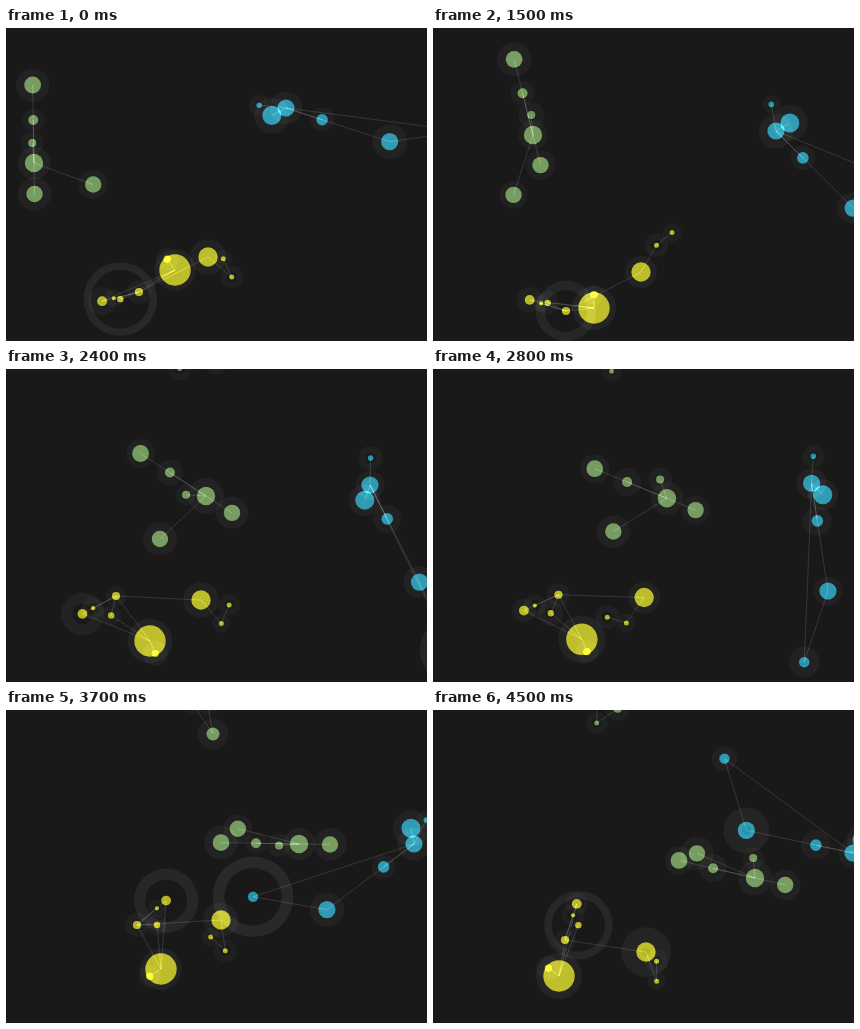
These frames come from a looping animation (421x313 px, 4600 ms). An HTML page with a canvas:

```html
<!DOCTYPE html>
<html lang="en">
<head>
<meta charset="utf-8">
<title>Drifting molecules</title>
<style>
html, body { margin: 0; width: 100%; height: 100%; overflow: hidden; background: #191919; }
canvas { display: block; width: 421px; height: 313px; }
</style>
</head>
<body>
<canvas id="stage" width="421" height="313"></canvas>
<script>
const LOOP = 4600, STEP = 100;
const KNOTS = [0, 800, 1500, 2400, 3200, 3700, 4500];
const GREEN = 'rgb(85,123,65)', BLUE = 'rgb(15,121,145)', YELLOW = 'rgb(155,155,10)';
const ctx = document.getElementById('stage').getContext('2d');

const dots = [], bonds = [];

function add(dot) {
  dot.seed = dots.length * 2.4;
  dots.push(dot);
  return dot;
}

// A hub follows key points; an arm turns around its parent at a fixed length.
// Flares are [time, size] pairs at which the halo swells.
const hub = (color, r, xs, ys, ...flares) => add({ color, r, xs, ys, flares });

function arm(parent, r, length, angle, ...flares) {
  const dot = add({ color: parent.color, parent, r, length, angle, flares });
  bonds.push([parent, dot]);
  return dot;
}

const link = (a, b) => bonds.push([a, b]);
const sway = (mid, size, period) => t => mid + size * Math.cos(2 * Math.PI * t / period);

// Green rod with two loose arms
const green = hub(GREEN, 9.2, [28, 60, 100, 200, 263, 293, 322], [135, 116, 107, 127, 130, 134, 168]);
const greenRod = [-91, -121, -104, -147, -166, -179, -167];
arm(green, 8.4, 78, greenRod);
arm(green, 5, 43, greenRod);
arm(green, 8.2, -31, greenRod);
arm(green, 4, 20, sway(-140, 45, 1500));
arm(green, 8.2, 63, [20, 54, 108, 137, 162, 194, 203]);

// Green visitor at the top edge
const visitor = hub(GREEN, 6.5, [150, 216, 225, 210, 208, 207, 165], [-60, -17, -60, -8, -30, 24, -24], [800, 18]);
link(arm(visitor, 4, 30, [-104, -104, -160, 49]), arm(visitor, 2.5, 37, [-123, -123, -210, 92]));

// Blue rod with a long tail
const blue = hub(BLUE, 8.6, [280, 314, 343, 364, 394, 408, 420], [80, 86, 103, 116, 114, 134, 143]);
const blueRod = [18, 36, 45, 63, 105, 143, 192];
arm(blue, 5.8, 38, blueRod);
const elbow = arm(blue, 8.6, 109, blueRod, [4500, 8]);
link(blue, arm(elbow, 5.2, 75, [-8, -12, 148, 253], [2400, 20], [3700, 28]));
arm(blue, 2.8, 27, [-174, -100, -80, -27], [800, 9]);
arm(blue, 9.5, 16, [152, 29, -30, 109, -48, -101, -56]);

// Yellow cluster around three hubs
const sun = hub(YELLOW, 15.7, [169, 155, 161, 144, 156, 155, 126], [242, 254, 280, 272, 268, 259, 266]);
const east = hub(YELLOW, 9.7, [202, 207, 208, 195, 228, 215, 213], [229, 230, 244, 231, 225, 210, 242], [4500, 8]);
const west = hub(YELLOW, 4.1, [133, 134, 133, 110, 143, 131, 132], [264, 265, 283, 227, 229, 215, 230], [1500, 17]);
const westRod = [166, 147, 197, 152, 186, 320, 288];
arm(west, 2.1, 26, westRod);
link(sun, arm(west, 4.9, 38, westRod, [2400, 9], [3700, 18]));
link(sun, arm(west, 3.2, 20, [159, 159, 204, 104, 165, 360, 312], [0, 27], [3200, 9], [4500, 23]));
arm(sun, 3.5, 13.5, [234, 315, 270, 427, 423, 508, 577]);
const hinge = arm(east, 2.5, 31, [40, -4, -60, 49, 178, 82, 70]);
arm(hinge, 2.5, 20, [245, 330, 321, 293, 114, 223, 270]);
link(west, east);
link(west, sun);

// Smooth curve through keys; short lists skip knots evenly.
function glide(keys, t) {
  const skip = (KNOTS.length - 1) / (keys.length - 1);
  const at = i => KNOTS[i * skip];
  const slope = i => {
    const a = Math.max(i - 1, 0), b = Math.min(i + 1, keys.length - 1);
    return (keys[b] - keys[a]) / (at(b) - at(a));
  };
  let i = 0;
  while (i < keys.length - 2 && t >= at(i + 1)) i++;
  const span = at(i + 1) - at(i), u = (t - at(i)) / span, w = 1 - u;
  return w * w * (1 + 2 * u) * keys[i] + u * u * (3 - 2 * u) * keys[i + 1]
    + span * u * w * (w * slope(i) - u * slope(i + 1));
}

function place(d, t) {
  if (!d.parent) {
    d.x = glide(d.xs, t);
    d.y = glide(d.ys, t);
    return;
  }
  const degrees = typeof d.angle === 'function' ? d.angle(t) : glide(d.angle, t);
  const a = degrees * Math.PI / 180;
  d.x = d.parent.x + d.length * Math.cos(a);
  d.y = d.parent.y + d.length * Math.sin(a);
}

function haloRadius(d, t) {
  const calm = 8 + 0.9 * d.r + 1.5 * Math.sin(t / 300 + d.seed);
  return d.flares.reduce((sum, [time, size]) => sum + size * Math.exp(-(((t - time) / 260) ** 2)), calm);
}

function circle(x, y, r) {
  ctx.moveTo(x + r, y);
  ctx.arc(x, y, r, 0, 2 * Math.PI);
}

function drawHalo(d, t) {
  const outer = haloRadius(d, t);
  ctx.fillStyle = `rgba(255,255,255,${(4 + 0.3 * outer) / 255})`;
  ctx.beginPath();
  circle(d.x, d.y, outer);
  circle(d.x, d.y, Math.max(0, outer - 2 * d.r - 1));
  ctx.fill('evenodd');
}

function drawDot(d) {
  ctx.fillStyle = d.color;
  ctx.beginPath();
  circle(d.x, d.y, d.r);
  ctx.fill();
}

function drawBond([a, b]) {
  ctx.beginPath();
  ctx.moveTo(a.x, a.y);
  ctx.lineTo(b.x, b.y);
  ctx.stroke();
}

function draw(t) {
  ctx.globalCompositeOperation = 'source-over';
  ctx.fillStyle = '#191919';
  ctx.fillRect(0, 0, 421, 313);
  ctx.globalCompositeOperation = 'lighter';
  ctx.strokeStyle = 'rgba(255,255,255,0.11)';
  ctx.lineWidth = 1;
  dots.forEach(d => place(d, t));
  dots.forEach(d => drawHalo(d, t));
  dots.forEach(drawDot);
  bonds.forEach(drawBond);
}

const start = performance.now();
function tick() {
  const t = (performance.now() - start) % LOOP;
  draw(Math.floor(t / STEP) * STEP);
  requestAnimationFrame(tick);
}
tick();
</script>
</body>
</html>
```
